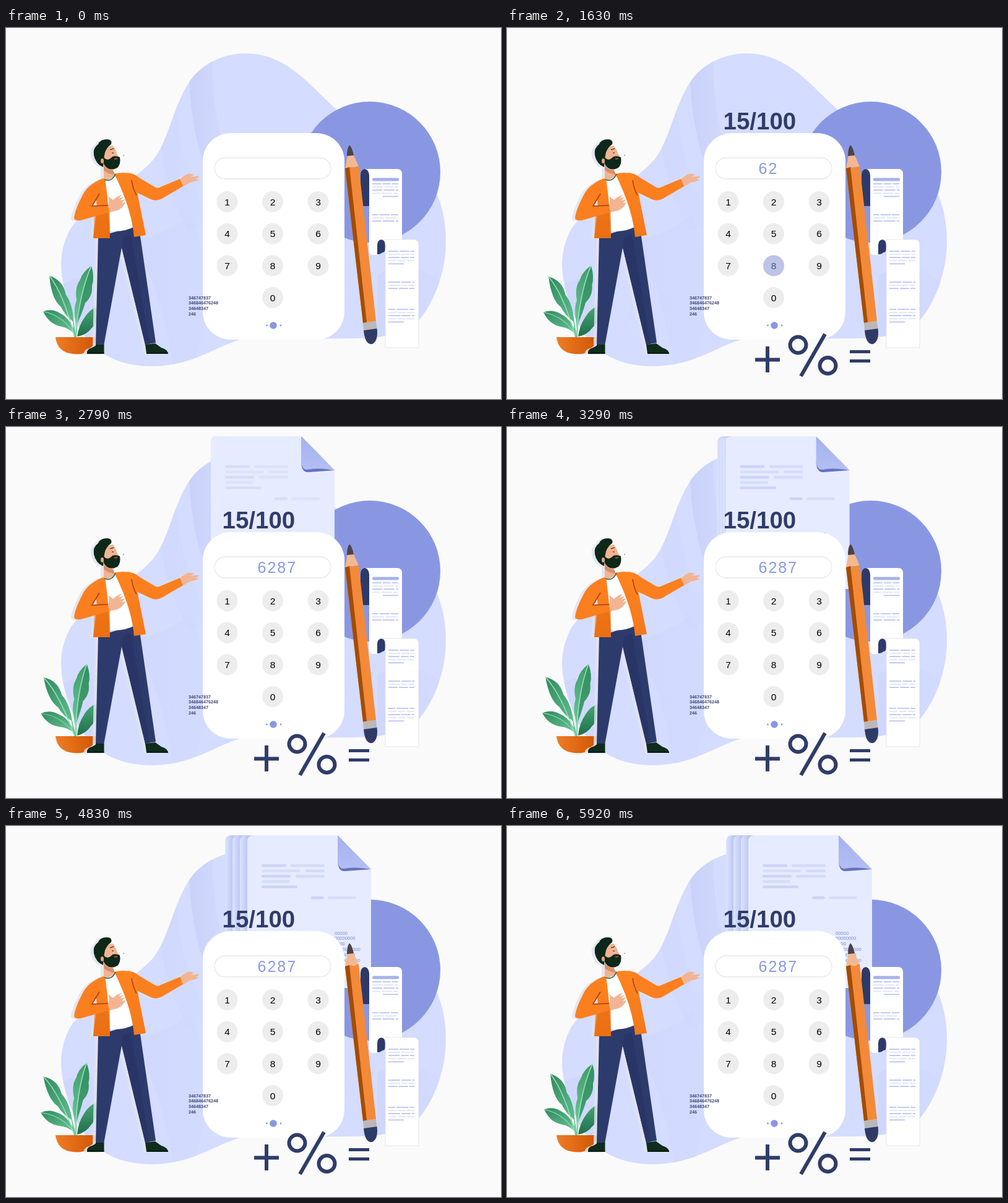
An HTML page that plays this animation: 800 by 600 pixels, repeating every 5.96 s.

```html
<!DOCTYPE html>
<html lang="en">
<head>
<meta charset="utf-8">
<title>Calculator</title>
<style>
html, body { margin: 0; width: 100%; height: 100%; overflow: hidden; background: #fafafa; }
svg { display: block; width: 800px; height: 600px; }
text { font-family: "Liberation Sans", Arial, sans-serif; }
#man { filter: drop-shadow(-5px 1px 0.5px rgba(224, 227, 238, .85)); }
</style>
</head>
<body>
<svg viewBox="0 0 800 600">
  <defs>
    <linearGradient id="leafA" x1="0" y1="0" x2="1" y2="1">
      <stop offset="0" stop-color="#2f8a5c"/><stop offset="1" stop-color="#6cc99b"/>
    </linearGradient>
    <linearGradient id="leafB" x1="0" y1="0" x2="0" y2="1">
      <stop offset="0" stop-color="#3f9c69"/><stop offset="1" stop-color="#74cea2"/>
    </linearGradient>
    <linearGradient id="leafC" x1="0" y1="0" x2="0" y2="1">
      <stop offset="0" stop-color="#4aa877"/><stop offset="1" stop-color="#1f6f4b"/>
    </linearGradient>
    <linearGradient id="potFill"><stop offset="0" stop-color="#ef7d25"/><stop offset="1" stop-color="#cf5503"/></linearGradient>
    <linearGradient id="jacket" x1="0" y1="0" x2="0" y2="1">
      <stop offset="0" stop-color="#ff8420"/><stop offset="1" stop-color="#f2781a"/>
    </linearGradient>
    <linearGradient id="band"><stop offset="0" stop-color="#c5cef7"/><stop offset="1" stop-color="#d0d8fc"/></linearGradient>
    <linearGradient id="edge" gradientUnits="userSpaceOnUse" x1="0" x2="13" y1="0" y2="0">
      <stop offset="0" stop-color="#dde4ff"/><stop offset="1" stop-color="#bac5f2"/>
    </linearGradient>
    <linearGradient id="foldFill" x1="0" y1="0" x2="0" y2="1">
      <stop offset="0" stop-color="#a4b1ee"/><stop offset="1" stop-color="#b3bff4"/>
    </linearGradient>
    <path id="blob" d="M387 41C352 41 316 58 297 86C270 126 264 180 238 213C205 252 137 276 104 325C78 372 90 420 110 468C132 520 175 547 235 547C300 547 335 517 378 504L560 502C612 501 640 496 667 473C694 441 711 392 711 345C711 303 700 264 672 225C645 190 575 168 533 131C490 92 453 41 387 41Z"/>
    <clipPath id="inBlob"><use href="#blob"/></clipPath>
  </defs>

  <use href="#blob" fill="#d4dcff"/>
  <g clip-path="url(#inBlob)" fill="url(#band)">
    <path d="M296 70Q296 150 322 230L352 190Q330 120 335 40Z" opacity=".75"/>
    <path d="M248 170Q252 250 296 330L330 310Q285 240 275 130Z" opacity=".25"/>
    <path d="M205 345Q270 330 300 300L330 400Q330 480 300 545L270 545Q250 420 205 345Z" opacity=".28"/>
    <path d="M80 420Q120 395 160 412L150 540L90 500Z" opacity=".4"/>
    <path d="M600 400Q655 365 712 420L680 510H600Z" opacity=".35"/>
  </g>
  <circle cx="588" cy="233" r="114" fill="#8997e3"/>

  <g id="papers"></g>

  <g id="receipts">
    <path d="M587 228H580Q573 229 573 238V288H587Z" fill="#2d3a68"/>
    <path d="M580 228H632Q640 228 640 236V345H613L600 367H592Q587 366 587 360V238Q586 229 580 228Z" fill="#fff"/>
    <path d="M613 342H607Q600 343 600 351V366Q606 366 608 363Q613 364 613 355Z" fill="#2d3a68"/>
    <path d="M607 342H659Q667 342 667 350V517H613V351Q613 343 607 342Z" fill="#fff" stroke="#d9dcea" stroke-width=".7"/>
    <rect x="592" y="242.500" width="43" height="5" rx="2" fill="#a5b2ec"/>
  </g>

  <rect x="318" y="170" width="229" height="334" rx="45" fill="#fff"/>
  <rect x="337" y="210" width="188" height="34" rx="17" fill="#fff" stroke="#e8e8ea" stroke-width="1.300"/>
  <g id="display" font-size="25" fill="#8b99e3"></g>
  <g id="keys" font-size="15.500" text-anchor="middle"></g>
  <g fill="#8997e3">
    <circle cx="432" cy="481" r="5.800"/><circle cx="421.500" cy="481" r="1.400"/><circle cx="444" cy="481" r="1.400"/>
  </g>

  <g id="pencil">
    <path d="M555 190L570 224L548 227Z" fill="#f3b892"/>
    <path d="M555 189.500Q559 192 562 206L551 207Q551 194 555 189.500Z" fill="#48444a"/>
    <path d="M548 227L555 225L562 226L570 223L598 474L577 477Z" fill="#f38a39"/>
    <path d="M548 227L555 225L583 476L577 477Z" fill="#a24c05"/>
    <path d="M577 477L598 474L599.500 486L578 489Z" fill="#bab8b8"/>
    <path d="M578 489L599.500 486Q602 506 592 511Q580 513 578 489Z" fill="#2f3b67"/>
  </g>

  <text id="ratio" x="349.500" y="164" font-size="38.500" font-weight="700" fill="#303c69">15/100</text>
  <g id="signs" fill="none" stroke="#303c69" stroke-width="6">
    <path d="M401 536.500H441M421 515V557"/>
    <g><circle cx="470.500" cy="512.500" r="13"/><circle cx="518.500" cy="546" r="13"/><path d="M514 495L475 563"/></g>
    <path d="M554 523.500H587M554 538.500H587" stroke-width="5"/>
  </g>
  <g id="figures" font-size="7.200" font-weight="700" fill="#3d4777"></g>

  <g id="plant">
    <g class="leaf" data-sway="2">
      <path d="M152 448Q149 475 138 484Q130 496 115 499Q117 480 127 466Q137 450 152 448Z" fill="url(#leafC)"/>
      <path d="M134 384Q140 402 136 416Q138 432 126 444Q122 460 115 478L114 500H111Q113 486 111 472Q107 455 112 440Q108 420 116 408Q120 394 134 384Z" fill="url(#leafB)"/>
      <path d="M134 384Q140 402 136 416Q138 432 126 444Q122 460 115 474Q119 425 134 384Z" fill="#2f8a5c" opacity=".65"/>
      <path d="M134 384Q117 425 112 498" fill="none" stroke="#9adfbd" stroke-width="1.500"/>
    </g>
    <g class="leaf" data-sway="3">
      <path d="M58 461Q72 455 86 463Q103 470 113 497Q100 485 88 484Q68 481 58 461Z" fill="url(#leafA)"/>
      <path d="M58 461Q94 467 112 499" fill="none" stroke="#9adfbd"/>
      <path d="M65 403Q88 409 93 432Q105 447 108 474L113 500H110L107 475Q94 466 86 452Q70 440 65 403Z" fill="url(#leafA)"/>
      <path d="M65 403Q90 432 110 498" fill="none" stroke="#9adfbd" stroke-width="1.500"/>
    </g>
    <path d="M80 500H146Q143 527.500 114 527.500Q83 527 80 500Z" fill="url(#potFill)"/>
  </g>

  <g id="man">
    <path d="M149 338L208 320L216 330L242 509L225 512L187 355L158 514L145 513Z" fill="#2d3b6c"/>
    <path d="M190 338L202 334L232 511L225 512L187 355Z" fill="#293566"/>
    <path d="M131 526.500H158.500V512H146Q143 516 136 518Q130 521 131 526.500ZM227 526.500H262Q261 520 251 517L241 510L225 512Z" fill="#0f2c1c"/>
    <path d="M131 526H158.500M227 526H262" stroke="#061a0f" stroke-width="2"/>
    <path d="M159 245L180 235Q198 285 208 321Q190 331 166 328Z" fill="#fff"/>
    <path d="M281 245Q289 236 297 235.500L304 237Q301 240 296 241L311 239.500Q314 241 306 244L312 245.500Q304 249 297 250L285 257Z" fill="#f2b493"/>
    <path d="M196 234Q207 235 215 242L240 257Q245 260 250 257L281 244L286 256L252 276Q242 281 234 277L207 264Z" fill="#fb7f1e"/>
    <path d="M175 236Q189 232 203 236L212 265L226 335L207 338Q203 292 175 236Z" fill="url(#jacket)"/>
    <path d="M203 246Q205 260 211 271" fill="none" stroke="#a83c12" stroke-width="1.500"/>
    <path d="M160 243Q149 245 143 252L147 290L141 340H168Q167 290 160 243Z" fill="url(#jacket)"/>
    <path d="M143 298L168 293L168 340H141Z" fill="#e4680c" opacity=".5"/>
    <path d="M158 243Q132 252 123 272Q111 295 110 308Q112 312 121 311L167 298L165 287L139 288L153 268Z" fill="#fb7f1e"/>
    <path d="M151 268L139 288L165 287" fill="none" stroke="#a83c12" stroke-width="1.500"/>
    <path d="M165 288Q168 279 165 272L173 278Q179 272 187 270L182 276L190 273L185 279L193 277L187 283L193 282Q189 291 180 295L168 298Z" fill="#f2b493"/>
    <path d="M158 202Q162 191 172 190Q178 196 179 203L183 209Q184 226 172 230L176 238Q167 248 158 244Z" fill="#f2b493"/>
    <path d="M158 222Q164 230 173 230L176 237Q166 237 158 230Z" fill="#d98f6d"/>
    <path d="M142 206Q140 194 149 188Q152 180 163 180Q172 180 170 188Q163 193 160 201L158 211L157 225Q145 220 142 206Z" fill="#0d2818"/>
    <path d="M158 209Q164 217 172 208Q178 206 184 209Q186 220 180 226Q170 231 163 226Q157 221 157 214Z" fill="#0d2818"/>
    <ellipse cx="155.500" cy="215" rx="2.500" ry="4" fill="#e8a482"/>
    <path d="M175 212L180 211" stroke="#d95b4b" stroke-width="1.500"/>
    <path d="M168 197L174 195M171 202H174" stroke="#0d2818" stroke-width="1.200"/>
    <path d="M159 245Q171 250 177 236" fill="none" stroke="#27684e" stroke-width="1.800"/>
  </g>
  <circle cx="190" cy="206" r=".8" fill="#555"/>
</svg>
<script>
const LOOP = 5960;
const $ = id => document.getElementById(id);

function add(parent, tag, attrs, label) {
  const el = document.createElementNS('http://www.w3.org/2000/svg', tag);
  for (const k in attrs) el.setAttribute(k, attrs[k]);
  if (label !== undefined) el.textContent = label;
  return parent.appendChild(el);
}
const ramp = (t, a, b) => Math.min(1, Math.max(0, (t - a) / (b - a)));
const smooth = p => p * p * (3 - 2 * p);

let seed = 7;
function random(min, max) {
  seed = seed * 16807 % 2147483647;
  return min + (max - min) * seed / 2147483647;
}

// Sheets, back to front, drawn with their top left corner at 0,0
const sheets = [0, 1, 2, 3].map(i => {
  const g = add($('papers'), 'g', {});
  add(g, 'path', { d: 'M10 0H146L200 55V247H0V10Q0 0 10 0Z', fill: i < 3 ? 'url(#edge)' : '#e6ebff' });
  add(g, 'path', { d: 'M146 40Q146 59 158 58L200 55L160 47Z', fill: '#6573bd' });
  add(g, 'path', { d: 'M146 0L200 55Q172 50 156 54Q148 54 146 44Z', fill: 'url(#foldFill)' });
  return g;
});

// Ruled text and a column of zeros on the front sheet
const writing = add(sheets[3], 'g', {});
const bar = (x, y, width, fill) => add(writing, 'rect', { x, y: y - 2.2, width, height: 4.4, rx: 2.2, fill });
for (let row = 0; row < 5; row++) {
  const width = random(40, 65), y = 49 + row * 8.6;
  bar(23, y, width, row % 2 ? '#d6ddfa' : '#cbd4f8');
  if (row < 3) bar(30 + width, y, 95 - width, '#d3dbfa');
}
bar(103, 101, 21, '#cbd4f8');
bar(130, 101, 46, '#d6ddfa');
[5, 8, 4, 10, 8, 10].forEach((n, i) =>
  add(writing, 'text', { x: 141, y: 160.5 + i * 8.8, 'font-size': 7.5, fill: '#7d8bd8' }, '0'.repeat(n)));

// A block of broken rows, dark and pale in turn; a long block ends in a short row
function printed(left, top, rows, alignRight) {
  const right = left + 42;
  for (let row = 0; row < rows; row++) {
    const y = top + row * 5.1;
    const last = row == 4;
    const from = last && alignRight ? right - 25 : left;
    const to = last && !alignRight ? left + 25 : right;
    for (let x = from; x < to;) {
      const end = last ? to : Math.min(to, x + random(9, 20));
      const stroke = row % 2 ? '#dce2f8' : '#b3bef0';
      add($('receipts'), 'path', { d: `M${x} ${y}H${end}`, stroke, 'stroke-width': 1.6 });
      x = end + 2;
    }
  }
}
printed(592, 252, 5, true);
printed(592, 302, 3, true);
printed(618, 361, 5);
printed(618, 411, 3);
printed(618, 455, 5);

['346747837', '346846476248', '34648347', '246'].forEach((s, i) =>
  add($('figures'), 'text', { x: 295, y: 438.7 + i * 8.7 }, s));

const glow = {};
[...'1234567890'].forEach((n, i) => {
  const cx = 357.5 + (n == 0 ? 1 : i % 3) * 73.5;
  const cy = 281 + Math.floor(i / 3) * 51.7;
  add($('keys'), 'circle', { cx, cy, r: 17, fill: '#ededed' });
  add($('keys'), 'text', { x: cx, y: cy + 5.5 }, n);
  glow[n] = add($('keys'), 'circle', { cx, cy, r: 17, fill: '#94a2e6', opacity: 0 });
});

const typed = [...'6287'];
const digits = typed.map((n, i) => add($('display'), 'text', { x: 406.5 + i * 15.9, y: 236 }, n));
const leaves = document.querySelectorAll('.leaf');

function rise(el, p, dist) {
  el.setAttribute('opacity', p);
  el.setAttribute('transform', `translate(0 ${dist * (1 - p)})`);
}

function draw(now) {
  const t = now % LOOP;

  const sway = Math.cos(t / LOOP * 6 * Math.PI);
  leaves.forEach(leaf => leaf.setAttribute('transform', `rotate(${leaf.dataset.sway * sway} 112 500)`));

  rise($('ratio'), smooth(ramp(t, 60, 460)), 16);
  [...$('signs').children].forEach((el, i) => rise(el, smooth(ramp(t, 60 + i * 70, 460 + i * 70)), 16));

  typed.forEach((n, i) => {
    const peak = 690 + i * 515;
    const level = t < peak ? ramp(t, peak - 200, peak) : 1 - ramp(t, peak, peak + 250);
    glow[n].setAttribute('opacity', smooth(level) * .92);
    digits[i].setAttribute('opacity', ramp(t, peak, peak + 130));
  });

  rise($('papers'), ramp(t, 2080, 2500), 12);
  writing.setAttribute('opacity', ramp(t, 2500, 3000));
  const spread = smooth(ramp(t, 3000, 3690));
  sheets.forEach((g, i) => g.setAttribute('transform', `translate(${331 + spread * (23 + 12 * i)} 15)`));
}

const start = performance.now();
function tick() {
  draw(performance.now() - start);
  requestAnimationFrame(tick);
}
tick();
</script>
</body>
</html>
```
